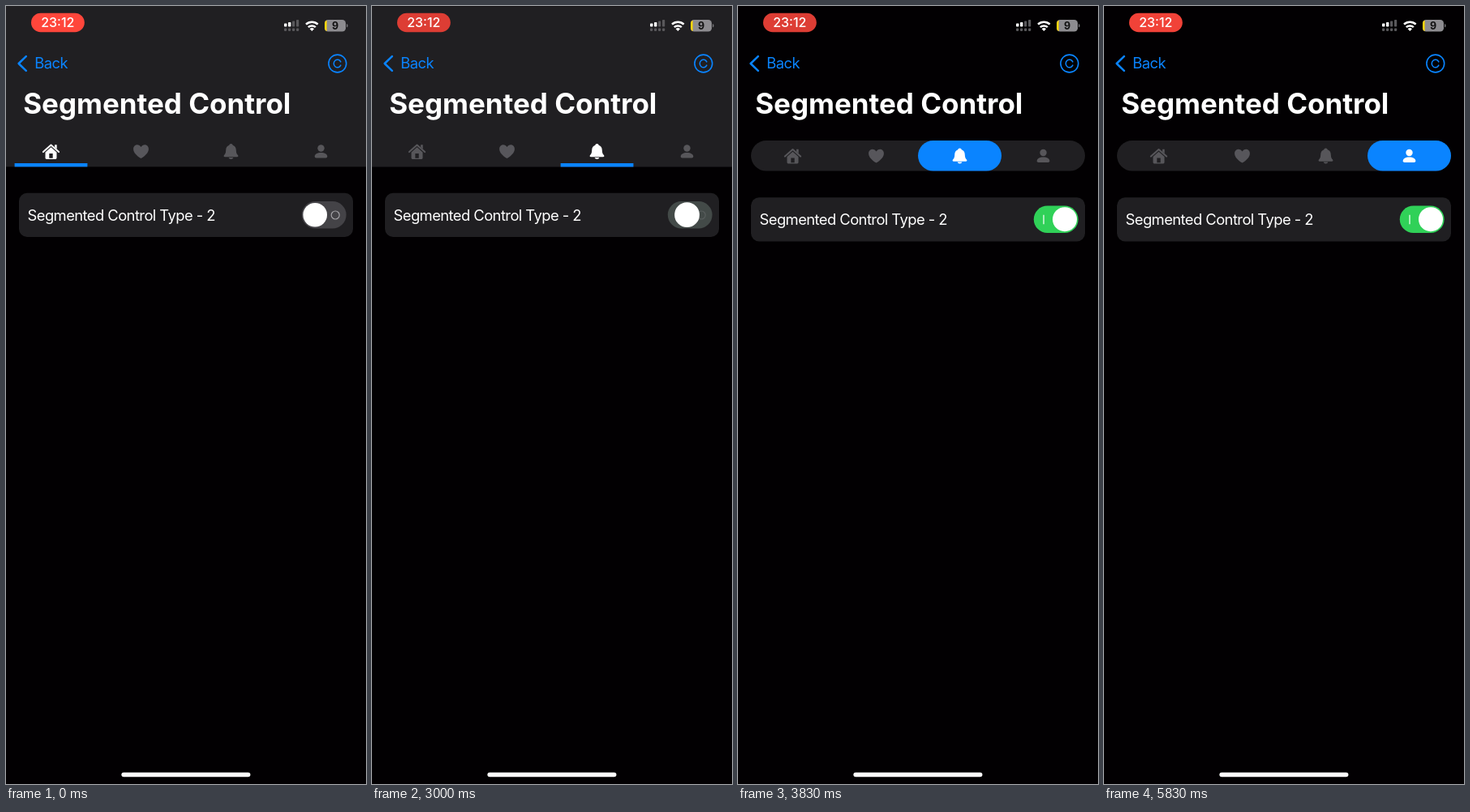
Recreate the animation shown at these times as an HTML page. Size 444x960 px, loop 6.27 s.

```html
<!DOCTYPE html>
<html lang="en">
<head>
<meta charset="utf-8">
<title>Segmented Control</title>
<style>
  html, body { margin: 0; width: 100%; height: 100%; overflow: hidden; background: #020002; }
  svg { display: block; width: 100vw; height: 100vh; }
  text { font-family: Inter, Roboto, sans-serif; fill: #fff; }
  .title { font-size: 35px; font-weight: 700; letter-spacing: -.02px; }
  .label { font-size: 18.4px; letter-spacing: -.57px; }
  .clock { font-size: 16px; font-weight: 500; text-anchor: middle; }
  .blue { fill: #0a84ff; }
  .blueline { fill: none; stroke: #0a84ff; }
  .panel { fill: #201f22; }
</style>
</head>
<body>
<svg viewBox="0 0 444 960">
  <rect id="panel" class="panel"/>
  <rect id="marker" class="blue"/>

  <!-- status bar -->
  <rect id="rec" x="31" y="8.7" width="65.8" height="23.6" rx="11.8"/>
  <text class="clock" x="63.8" y="26.2">23:12</text>
  <g fill="#fff">
    <rect x="343" y="21.5" width="3.4" height="4" rx=".8"/>
    <rect x="348" y="20" width="3.4" height="5.5" rx=".8"/>
  </g>
  <g fill="#59585b">
    <rect x="353" y="18.6" width="3.2" height="6.9" rx=".8"/>
    <rect x="358" y="17" width="3.2" height="8.5" rx=".8"/>
    <rect x="343" y="27.5" width="3.2" height="3.4" rx=".8"/>
    <rect x="348" y="27.5" width="3.2" height="3.4" rx=".8"/>
    <rect x="353" y="27.5" width="3.2" height="3.4" rx=".8"/>
    <rect x="358" y="27.5" width="3.2" height="3.4" rx=".8"/>
  </g>
  <g fill="none" stroke="#fff" stroke-width="2.5">
    <path d="M370 22.7a10.5 10.5 0 0 1 14.6 0"/>
    <path d="M372.8 26.2a6.5 6.5 0 0 1 9 0"/>
  </g>
  <path d="M374.6 28.2a3.9 3.9 0 0 1 5.4 0l-2.7 2.8z" fill="#fff"/>
  <rect x="393" y="17" width="26" height="14.5" rx="4.3" fill="#8d8c90"/>
  <path d="M395.6 17.4v13.7a4.3 4.3 0 0 1-2.6-3.9v-5.9a4.3 4.3 0 0 1 2.6-3.9z" fill="#ffd60a"/>
  <path d="M420 22v4.6q1.6-.6 1.6-2.3t-1.6-2.3z" fill="#77767a"/>
  <text x="406" y="28.8" text-anchor="middle" style="font-size:12.5px;font-weight:700;fill:#111">9</text>

  <!-- navigation -->
  <path class="blueline" d="M24.8 62.2 15.6 71l9.2 8.8" stroke-width="2.5" stroke-linecap="round" stroke-linejoin="round"/>
  <text class="label" x="35.3" y="77.4" style="fill:#0a84ff">Back</text>
  <circle class="blueline" cx="408.8" cy="71" r="10.9" stroke-width="1.6"/>
  <path class="blueline" d="M412.8 68.9a4.5 4.8 0 1 0 0 4.2" stroke-width="1.5" stroke-linecap="round"/>
  <text class="title" x="21.2" y="133">Segmented Control</text>

  <!-- tab icons, each centred on 0,0 -->
  <g class="icon">
    <path d="M-9.6.6 0-7.9 9.6.6" fill="none" stroke="currentColor" stroke-width="2" stroke-linecap="round" stroke-linejoin="round"/>
    <path d="M4.6-8.2h2.6v5.2L4.6-5.2z"/>
    <path fill-rule="evenodd" d="M-7 1 0-5.2 7 1v7q0 1.4-1.4 1.4H-5.6Q-7 9.4-7 8zM-2.2 2.4v5.8h4.4V2.4z"/>
  </g>
  <g class="icon">
    <path d="M0 8.6C-5 5.3-9.4 1.6-9.4-3.1-9.4-6.2-7.3-8.3-4.7-8.3-2.6-8.3-.9-7.2 0-5.4.9-7.2 2.6-8.3 4.7-8.3 7.3-8.3 9.4-6.2 9.4-3.1 9.4 1.6 5 5.3 0 8.6z"/>
  </g>
  <g class="icon">
    <path d="M0-9.6c1.3 0 2.1.8 2.2 1.9C5-6.8 6.2-4.6 6.3-1.6c.1 3.3.9 4.6 2 5.9 1.1 1.2.7 2.4-.8 2.4H-7.5C-9 6.7-9.4 5.5-8.3 4.3c1.1-1.3 1.9-2.6 2-5.9C-6.2-4.6-5-6.8-2.2-7.7-2.1-8.8-1.3-9.6 0-9.6z"/>
    <path d="M-2.9 7.5h5.8Q2.3 9.6 0 9.6t-2.9-2.1z"/>
  </g>
  <g class="icon">
    <circle cy="-4" r="4.2"/>
    <path d="M-7.8 6.2C-7.8 3.6-4.6 1.5 0 1.5S7.8 3.6 7.8 6.2Q7.8 8 5.9 8H-5.9Q-7.8 8-7.8 6.2z"/>
  </g>

  <!-- settings row -->
  <g id="row">
    <rect class="panel" x="16" y="230.7" width="412" height="54.3" rx="10"/>
    <text class="label" x="26.5" y="264.6">Segmented Control Type - 2</text>
    <rect id="track" x="364.8" y="241" width="54.8" height="33.5" rx="16.75"/>
    <path id="on" d="M377 252.3v11.4" stroke="#fff" stroke-width="1.2"/>
    <circle id="off" cx="406.2" cy="258" r="5" fill="none" stroke="#a3a2a6" stroke-width="1.2"/>
    <circle id="knob" cy="257.7" fill="#fff"/>
  </g>
  <rect x="142.4" y="945.8" width="159" height="5.5" rx="2.75" fill="#fff"/>
</svg>
<script>
const LOOP = 6270;
const $ = id => document.getElementById(id);
const icons = [...document.querySelectorAll('.icon')];
const mix = (a, b, k) => a + (b - a) * k;
const clamp = v => Math.max(0, Math.min(1, v));
const blend = (a, b, k) => `rgb(${a.map((v, i) => Math.round(mix(v, b[i], k)))})`;
const set = (el, attrs) => {
  for (const k in attrs) el.setAttribute(k, attrs[k]);
};

// Progress of a spring released at ms = 0; response in seconds.
function spring(ms, response, damping) {
  if (ms <= 0) return 0;
  const w = 2 * Math.PI / response * ms / 1000;
  if (damping === 1) return 1 - (1 + w) * Math.exp(-w);
  const q = Math.sqrt(1 - damping * damping);
  return 1 - Math.exp(-damping * w) * (Math.cos(q * w) + damping / q * Math.sin(q * w));
}
const edge = ms => spring(ms, .25, 1);
const snappy = ms => spring(ms, .5, .85);

// Taps on the tabs: home > bell > home > person.
const taps = [
  { at: 840, from: 0, to: 2 },
  { at: 4130, from: 2, to: 0 },
  { at: 5015, from: 0, to: 3 }
];

// Brightness of the recording badge: time, level.
const glow = [[0, 1], [500, 1], [1000, 0], [4130, 0], [4400, 1], [4950, 1], [5200, .15], [5570, .6], [LOOP, .6]];

function glowAt(t) {
  const i = glow.findIndex(g => g[0] > t);
  const [t0, a] = glow[i - 1], [t1, b] = glow[i];
  return mix(a, b, (t - t0) / (t1 - t0));
}

function drawTabs(t) {
  const p = snappy(t - 2995);
  const x = 16 * p, y = 166 * p, width = 444 - 2 * x;
  const bottom = mix(198.4, 203.6, p), tab = width / 4;
  set($('panel'), { x, y, width, height: bottom - y, rx: Math.max(0, Math.min((bottom - y) / 2, 34 * p)) });

  // The near edge stretches first, the far edge follows.
  const left = 2 * edge(t - 1095) - 2 * edge(t - 4130)
    + 2 * (edge(t - 4375) - edge(t - 4379)) + 3 * edge(t - 5265);
  const right = 2 * edge(t - 840) - 2 * edge(t - 4379) + 3 * edge(t - 5015);
  const step = mix(111, 103, edge(t - 3240));
  const inset = 10.6 * (1 - p);
  const x0 = x + step * left + inset, x1 = x + step * right + tab - inset;
  const top = mix(194, 166, p), height = bottom - top;
  set($('marker'), { x: x0, y: top, width: x1 - x0, height, rx: Math.max(0, Math.min(height / 2, 30 * p)) });

  const active = [1, 0, 0, 0];
  for (const { at, from, to } of taps) {
    const k = snappy(t - at);
    active[from] -= k;
    active[to] += k;
  }
  icons.forEach((icon, i) => {
    const k = clamp(active[i]);
    const color = blend([142, 142, 147], [255, 255, 255], k);
    set(icon, {
      transform: `translate(${x + tab * (i + .5)} ${179.5 + 5.5 * p})`,
      fill: color, color, opacity: mix(.5, 1, k)
    });
  });
  set($('row'), { transform: `translate(0 ${5.5 * p})` });
}

function drawSwitch(t) {
  const k = spring(t - 2930, .39, .85);
  const c = clamp((t - 2985) / 300);
  set($('knob'), { cx: mix(381.2, 403, k), r: 14.8 + .6 * Math.sin(Math.PI * clamp(k)) + .2 * clamp(k) });
  set($('track'), { fill: blend([68, 67, 71], [48, 209, 88], c) });
  set($('off'), { opacity: clamp(1 - 2.3 * k) });
  set($('on'), { opacity: c });
}

let start;
function frame(now) {
  start ??= now;
  const t = (now - start) % LOOP;
  drawTabs(t);
  drawSwitch(t);
  set($('rec'), { fill: blend([221, 61, 52], [255, 70, 59], glowAt(t)) });
  requestAnimationFrame(frame);
}
requestAnimationFrame(frame);
</script>
</body>
</html>
```
